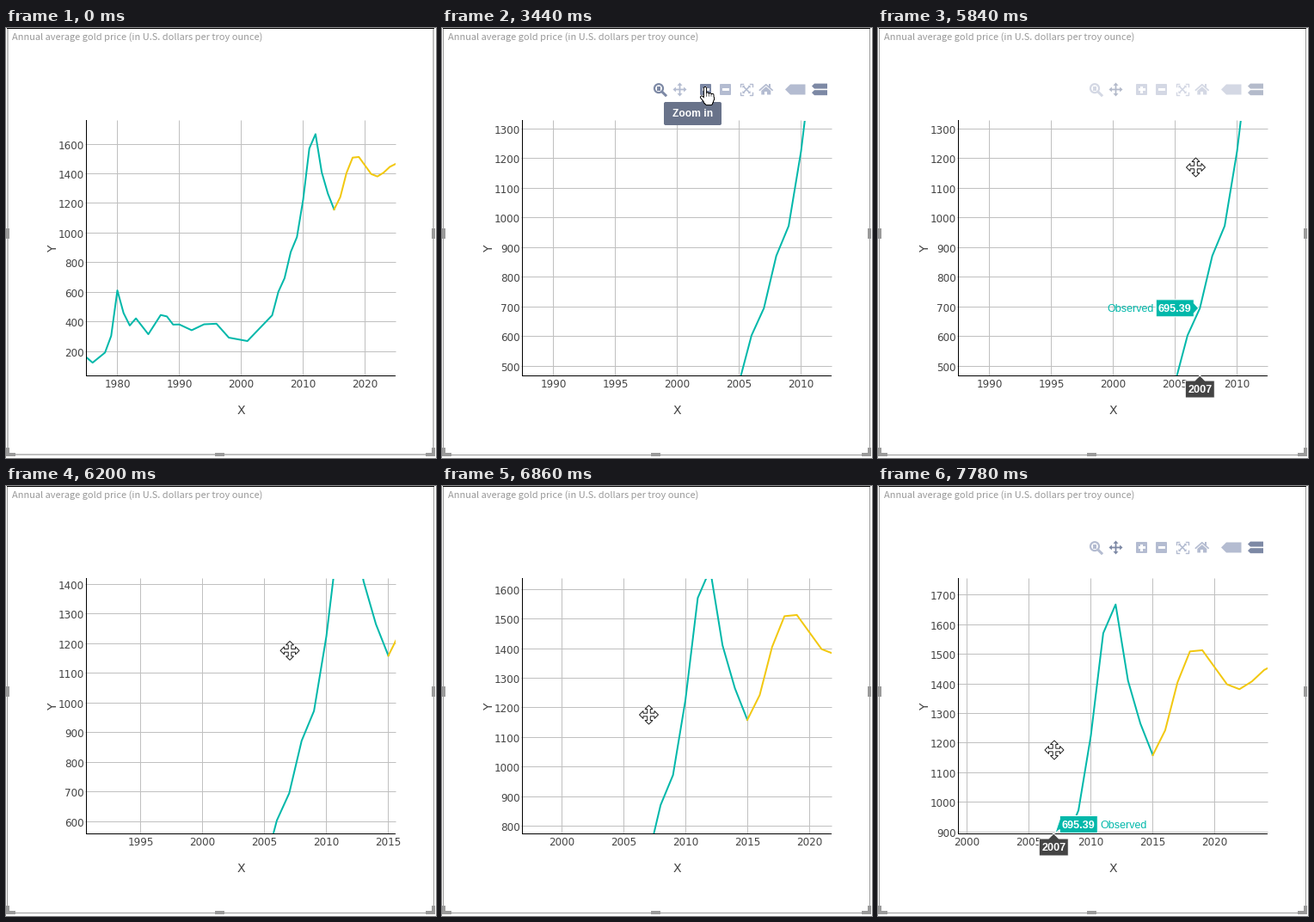
These frames come from a looping animation (500 px wide and 500 px high, 8000 ms). A matplotlib script:

```python
import numpy as np
import matplotlib.pyplot as plt
from matplotlib.animation import FuncAnimation
from matplotlib.patches import Circle, FancyBboxPatch, Polygon, Rectangle

SIZE, DPI = 500, 100
LOOP, STEP = 8000, 20
PX = 72 / DPI                                # points per pixel

TEAL, YELLOW = "#01b8aa", "#f2c80f"
GRID, INK, EDGE = "#c0c0c0", "#444444", "#9a9a9a"
PALE, ACTIVE, TIP = "#b4bcd1", "#7d89a5", "#69738a"

LEFT, RIGHT, TOP, BOTTOM = 93, 453, 108, 404
MID_X, MID_Y = 273.5, 256
MID_YEAR, MID_PRICE = 2000, 898

# turning points of the price; straight in between
TURNS = {1975: 161, 1976: 125, 1978: 193, 1979: 306, 1980: 613, 1981: 460,
         1982: 376, 1983: 424, 1985: 317, 1987: 447, 1988: 437, 1989: 382,
         1990: 383, 1992: 344, 1994: 384, 1996: 388, 1998: 294, 2001: 271,
         2005: 445, 2006: 603.34, 2007: 695.39, 2008: 872, 2009: 973,
         2010: 1225, 2011: 1571, 2012: 1668, 2013: 1411, 2014: 1266,
         2015: 1160}
OBS_YEARS = np.arange(1975, 2016)
OBSERVED = np.interp(OBS_YEARS, list(TURNS), list(TURNS.values()))

# a damped swing around a level, after a steep start
AHEAD = np.arange(11)
FC_YEARS = 2015 + AHEAD
FORECAST = (1436 + 90 * np.exp(0.15 * (3.6 - AHEAD))
            * np.cos(np.pi * (AHEAD - 3.6) / 3.4)
            - 125 * np.exp(-(AHEAD / 1.9) ** 2))

# key points: time, then values
CURSOR = [(600, 508, 34), (1240, 310, 68), (3439, 310, 68), (3440, 306, 68),
          (3700, 277, 70), (5050, 277, 70), (5840, 369.5, 162),
          (5920, 375, 160)]
PAN = [(5920, 0, 0), (6580, -106, 74), (7140, -163, 138), (7320, -170, 147)]
BAR = [(700, 0), (1000, 1), (5750, 1), (5960, 0), (7500, 0), (7780, 1)]

fig = plt.figure(figsize=(SIZE / DPI, SIZE / DPI), dpi=DPI, facecolor="white")
ax = fig.add_axes([0, 0, 1, 1])
ax.set_xlim(0, SIZE)
ax.set_ylim(SIZE, 0)
ax.axis("off")


def track(t, keys):
    cols = list(zip(*keys))
    return [float(np.interp(t, cols[0], c)) for c in cols[1:]]


def put(patch, z):
    patch.set_zorder(z)
    return ax.add_patch(patch)


def rect(x, y, w, h, color, z=1):
    return put(Rectangle((x, y), w, h, fc=color, lw=0), z)


def rounded(x, y, w, h, color, z, r=2):
    return put(FancyBboxPatch((x + r, y + r), w - 2 * r, h - 2 * r, fc=color,
                              boxstyle=f"round,pad={r},rounding_size={r}",
                              lw=0), z)


def poly(points, color, z=5, edge="none", lw=0.0):
    return put(Polygon(points, closed=True, fc=color, ec=edge, lw=lw * PX), z)


def stroke(xs, ys, color, width=1, z=2, **kw):
    return ax.plot(xs, ys, color=color, lw=width * PX, zorder=z, **kw)[0]


def text(x, y, s, px, color, z=3, ha="left", font="DejaVu Sans", **kw):
    return ax.text(x, y, s, fontsize=px * PX, color=color, family=font, ha=ha,
                   va=kw.pop("va", "baseline"), zorder=z, **kw)


def show(parts, on):
    for p in parts:
        p.set_visible(on)


def turned(points, quarters):
    for _ in range(quarters):
        points = [(-y, x) for x, y in points]
    return points


def moved(points, x, y):
    return [(x + a, y + b) for a, b in points]


def four_arrows(tip, base, wing, half):
    """Outline of a cross with an arrow head on each arm."""
    arm = [(0, -tip), (wing, -base), (half, -base), (half, -half),
           (base, -half), (base, -wing)]
    return sum((turned(arm, q) for q in range(4)), [])


# --- visual frame with handles
def border(width, bottom, color):
    return [rect(1, 1, width, 495, color),
            rect(498 - width, 1, width, 495, color),
            rect(1, bottom, 497, width, color)]


soft = border(2, 495, GRID)
crisp = border(1, 496, EDGE)
rect(1, 0, 497, 1, "black")
for side in (0, 495):
    rect(side, 233, 4, 12, EDGE, 2)
    rect(side, 488, 4, 10, EDGE, 2)
for x in (0, 243, 488):
    rect(x, 494, 11, 4, EDGE, 2)
text(7, 14, "Annual average gold price (in U.S. dollars per troy ounce)",
     11.02, "#999999", font="Noto Sans CJK JP")

# --- chart
grid_x = stroke([], [], GRID, snap=False)
grid_y = stroke([], [], GRID, snap=False)
observed = stroke([], [], TEAL, 2, 3)
forecast = stroke([], [], YELLOW, 2, 3)
for line in (observed, forecast):
    line.set_clip_path(Rectangle((LEFT, TOP), RIGHT - LEFT, BOTTOM - TOP,
                                 transform=ax.transData))
rect(LEFT, TOP - 1, 1, 298, "black", 4)
rect(LEFT, BOTTOM, RIGHT - LEFT, 1, "black", 4)
text(MID_X, 449, "X", 14, INK, ha="center")
text(55, MID_Y, "Y", 14, INK, ha="center", va="center", rotation=90)
x_labels = [text(0, 418, "", 12, INK, ha="center") for _ in range(8)]
y_labels = [text(91, 0, "", 12, INK, ha="right") for _ in range(11)]

# --- toolbar
magnifier = [put(Circle((252, 70.2), 5, fill=False, lw=2.2 * PX), 5),
             stroke([256, 260], [74.3, 78.2], PALE, 3, 5),
             rect(249.6, 67.8, 4.8, 4.8, PALE, 5)]
pan_icon = [poly(moved(four_arrows(8, 4.6, 3, 0.9), 276.5, 71.5), PALE)]


def sign_button(x, plus):
    body = rounded(x, 65, 13, 13, PALE, 5, 1)
    rect(x + 2.5, 70.4, 8, 2.2, "white", 5.1)
    if plus:
        rect(x + 5.4, 67.5, 2.2, 8, "white", 5.1)
    return [body]


plus_icon = sign_button(300, True)
sign_button(323, False)

# fit button: corner brackets around a cross of arrows
for q in range(4):
    bracket = turned([(-3.6, -6.8), (-6.8, -6.8), (-6.8, -3.6)], q)
    stroke(*zip(*moved(bracket, 354, 71.5)), PALE, 1.4, 5)
    head = turned([(-4.6, -4.6), (-1.6, -4.6), (-4.6, -1.6)], q)
    poly(moved(head, 354, 71.5), PALE)
for d in (-3, 3):
    stroke([351, 357], [71.5 - d, 71.5 + d], PALE, 1.6, 5)

# home button
stroke([369.5, 376.8, 384], [72.2, 65.8, 72.2], PALE, 1.7, 5)
poly([(371.3, 73), (376.8, 68.2), (382.3, 73), (382.3, 77.5),
      (371.3, 77.5)], PALE)
rect(375.4, 73.6, 2.8, 4, "white", 5.1)
rect(380, 65.4, 2, 4, PALE, 5)


def tag(x, y, w, h, color):
    poly([(x, y), (x + h / 2, y - h / 2), (x + w, y - h / 2),
          (x + w, y + h / 2), (x + h / 2, y + h / 2)], color)


tag(399, 71.5, 23.5, 12, PALE)
for y in (67.6, 75.2):
    tag(430, y, 18, 6, ACTIVE)
veil = rect(240, 62, 212, 19, "white", 6)


def tooltip(cx, width, word):
    x = cx + 18 - width
    return [rounded(x, 86, width, 27, TIP, 7),
            poly([(cx - 6, 86), (cx, 80), (cx + 6, 86)], TIP, 7),
            text(x + width / 2, 103, word, 12, "white", 8, "center",
                 "Liberation Sans", weight="bold")]


zoom_tip = tooltip(307, 67, "Zoom in")
pan_tip = tooltip(277, 42, "Pan")

# --- hover labels
HOVER_FONT = "Liberation Sans"
year_box = poly([(0, 0)] * 3, INK, 5, "white", 1)
year_text = text(0, 424, "", 12.6, "white", 6, "center", HOVER_FONT,
                 weight="bold")
price_box = poly([(0, 0)] * 3, TEAL, 5, "white", 1)
price_text = text(0, 0, "", 12.6, "white", 6, "center", HOVER_FONT,
                  weight="bold")
name_text = text(0, 0, "Observed", 12.5, TEAL, 6, "left", HOVER_FONT)
hover = [year_box, year_text, price_box, price_text, name_text]

# --- cursors
POINTER = [(0, 0), (0, 16), (3.8, 12.6), (6.3, 18), (8.6, 17), (6.2, 11.6),
           (11.5, 11.3)]
CROSS = four_arrows(11, 6.5, 4.5, 1.8)
cursor = poly(POINTER, "white", 10, "#222222", 1)


def hand_path():
    """Finger, knuckle, thumb and palm strokes, split by gaps."""
    gap = (np.nan, np.nan)
    pts = [(-4, 12.5), (0, 17), gap]
    for i in range(4):
        top = 7.8 + 0.7 * i if i else 2
        pts += [(2.8 * i, top), (2.8 * i, 15), gap]
    for y in range(13, 21):
        pts += [(max(0, y - 18) - 0.2, y), (8.4 - max(0, y - 16) * 0.4, y),
                gap]
    return np.array(pts)


HAND = hand_path()
hand = [stroke([], [], color, width, z, solid_capstyle="round")
        for color, width, z in (("black", 4.2, 10), ("white", 2.2, 11))]


def grid_lines(at, lo, hi):
    """Pixel-centred parallel lines, split by gaps."""
    along = np.repeat(np.floor(at) + 0.5, 3)
    across = np.tile([lo, hi, np.nan], len(at))
    return along, across


def fill_labels(labels, values, place):
    for i, label in enumerate(labels):
        on = i < len(values)
        label.set_visible(on)
        if on:
            label.set_text(str(values[i]))
            place(label, i)


def draw_chart(zoom, dx, dy):
    kx, ky = 7.2 * zoom, 0.17225 * zoom

    def to_x(year):
        return MID_X + dx + (np.asarray(year) - MID_YEAR) * kx

    def to_y(price):
        return MID_Y + dy - (np.asarray(price) - MID_PRICE) * ky

    years = np.arange(1970, 2031, 10 // zoom)
    years = years[(to_x(years) > LEFT + 1) & (to_x(years) <= RIGHT)]
    prices = np.arange(0, 2001, 200 // zoom)
    prices = prices[(to_y(prices) >= TOP) & (to_y(prices) < BOTTOM)]
    gx, gy = to_x(years), to_y(prices)
    grid_x.set_data(*grid_lines(gx, TOP, BOTTOM))
    grid_y.set_data(*grid_lines(gy, LEFT, RIGHT)[::-1])
    fill_labels(x_labels, years, lambda lab, i: lab.set_x(gx[i]))
    fill_labels(y_labels, prices,
                lambda lab, i: lab.set_y(np.floor(gy[i]) + 6))
    observed.set_data(to_x(OBS_YEARS), to_y(OBSERVED))
    forecast.set_data(to_x(FC_YEARS), to_y(FORECAST))
    return to_x, to_y


def draw_hover(cx, to_x, to_y):
    i = int(np.argmin(np.abs(to_x(OBS_YEARS) - cx)))
    x, y = float(to_x(OBS_YEARS[i])), float(to_y(OBSERVED[i]))
    year_box.set_xy([(x, 404), (x + 6, 410), (x + 17, 410), (x + 17, 430),
                     (x - 17, 430), (x - 17, 410), (x - 6, 410)])
    year_text.set_text(str(OBS_YEARS[i]))
    year_text.set_x(x)
    side = -1 if x > 300 else 1
    mid = min(y, 393.5)
    near, far = x + 7 * side, x + 51 * side
    tip = (x + side * 1.5, min(y, BOTTOM))
    price_box.set_xy([tip, (near, mid - 6), (near, mid - 10), (far, mid - 10),
                      (far, mid + 10), (near, mid + 10), (near, mid + 6)])
    price_text.set_text(f"{OBSERVED[i]:.2f}")
    price_text.set_position(((near + far) / 2, mid + 4.5))
    name_text.set_ha("left" if side > 0 else "right")
    name_text.set_position((far + 3 * side, mid + 4.5))


def draw_cursor(t, x, y):
    on_button = 1200 <= t < 5150
    cursor.set_xy(moved(CROSS if y > TOP else POINTER, x, y))
    for line in hand:
        line.set_data(HAND[:, 0] + x, HAND[:, 1] + y)
    show(hand, on_button)
    cursor.set_visible(t >= 600 and not on_button)


def tint(parts, on):
    for p in parts:
        p.set_color(ACTIVE if on else PALE)


def update(frame):
    t = frame * STEP
    dx, dy = track(t, PAN)
    cx, cy = track(t, CURSOR)
    cx, cy = cx + dx, cy + dy
    to_x, to_y = draw_chart(2 if t >= 2270 else 1, dx, dy)

    show(soft, t < 600)
    show(crisp, t >= 600)
    over_plus = 1220 <= t < 3560
    tint(magnifier, t < 4590)
    tint(pan_icon, t >= 3640)
    tint(plus_icon, over_plus)
    veil.set_alpha(1 - track(t, BAR)[0])
    show(zoom_tip, over_plus)
    show(pan_tip, 3640 <= t < 5150)

    hovering = (5050 < t < 5900 and cy > TOP) or t >= 7500
    show(hover, hovering)
    if hovering:
        draw_hover(cx, to_x, to_y)
    draw_cursor(t, cx, cy)
    return []


anim = FuncAnimation(fig, update, frames=LOOP // STEP, interval=STEP,
                     init_func=lambda: update(0), repeat=True, repeat_delay=0,
                     blit=False)
plt.show()
```
